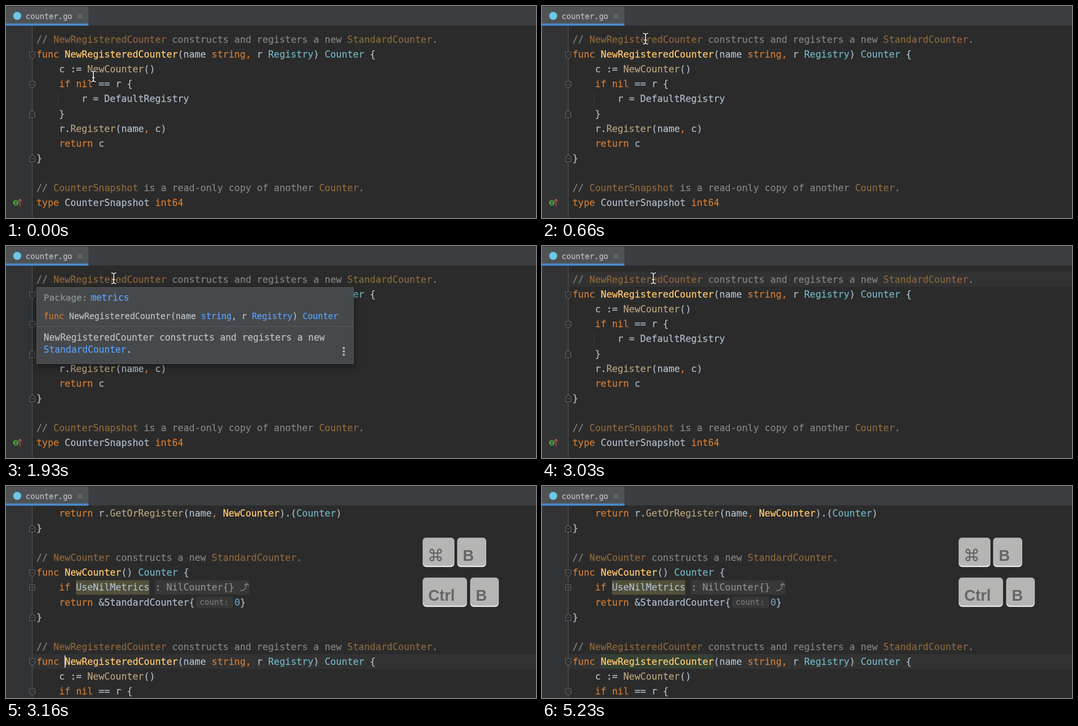
An HTML page with a canvas for the animation above (5.26 s loop, 1183 by 473 pixels).

```html
<!DOCTYPE html>
<html lang="en">
<head>
<meta charset="utf-8">
<title>Jump to declaration</title>
<style>
html, body { margin: 0; width: 100%; height: 100%; overflow: hidden; background: #2b2b2b; }
canvas { display: block; }
</style>
</head>
<body>
<canvas id="stage" width="1183" height="473"></canvas>
<script>
const ctx = document.getElementById('stage').getContext('2d');
const LOOP = 5260, ROW = 33.1, LEFT = 68, SIZE = 20.96;
const MONO = '"DejaVu Sans Mono", monospace';

const INK = {
  d: '#a9b7c6', k: '#cc7832', f: '#ffc66d', t: '#6fafbd', c: '#808080',
  r: '#8a653b', m: '#b09d79', n: '#6897bb', g: '#8c8c8c', h: '#787878',
  b: '#589df6', w: '#bbbbbb', p: '#8f9294'
};

// Each line: indent, then pairs of ink and text.
const CODE = [
  [4, 'k', 'return ', 'd', 'r.', 'm', 'GetOrRegister', 'd', '(name', 'k', ', ', 'f', 'NewCounter', 'd', ').(', 't', 'Counter', 'd', ')'],
  [0, 'd', '}'],
  [0],
  [0, 'c', '// ', 'r', 'NewCounter', 'c', ' constructs a new ', 'r', 'StandardCounter', 'c', '.'],
  [0, 'k', 'func ', 'f', 'NewCounter', 'd', '() ', 't', 'Counter', 'd', ' {'],
  [4, 'k', 'if ', 'd', 'UseNilMetrics ', 'g', ': NilCounter{}'],
  [4, 'k', 'return ', 'd', '&StandardCounter{'],
  [0, 'd', '}'],
  [0],
  [0, 'c', '// ', 'r', 'NewRegisteredCounter', 'c', ' constructs and registers a new ', 'r', 'StandardCounter', 'c', '.'],
  [0, 'k', 'func ', 'f', 'NewRegisteredCounter', 'd', '(name ', 'k', 'string, ', 'd', 'r ', 't', 'Registry', 'd', ') ', 't', 'Counter', 'd', ' {'],
  [4, 'd', 'c := ', 'm', 'NewCounter', 'd', '()'],
  [4, 'k', 'if nil ', 'd', '== r {'],
  [8, 'd', 'r = DefaultRegistry'],
  [4, 'd', '}'],
  [4, 'd', 'r.', 'm', 'Register', 'd', '(name', 'k', ', ', 'd', 'c)'],
  [4, 'k', 'return ', 'd', 'c'],
  [0, 'd', '}'],
  [0],
  [0, 'c', '// ', 'r', 'CounterSnapshot', 'c', ' is a read-only copy of another ', 'r', 'Counter', 'c', '.'],
  [0, 'k', 'type ', 'd', 'CounterSnapshot ', 'k', 'int64']
];
const FOLDS = { 1: 'end', 4: 'start', 5: 'plus', 7: 'end', 10: 'start', 12: 'start', 14: 'end', 17: 'end' };

function rect(x, y, w, h, fill) {
  ctx.fillStyle = fill;
  ctx.fillRect(x, y, w, h);
}

function disc(x, y, r, fill) {
  ctx.fillStyle = fill;
  ctx.beginPath();
  ctx.arc(x, y, r, 0, Math.PI * 2);
  ctx.fill();
}

function box(x, y, w, h, r, fill) {
  ctx.fillStyle = fill;
  ctx.beginPath();
  ctx.roundRect(x, y, w, h, r);
  ctx.fill();
}

function stroke(path, color, width) {
  ctx.strokeStyle = color;
  ctx.lineWidth = width;
  ctx.stroke(new Path2D(path));
}

// A hairline outline gives the glyphs a medium weight.
function text(x, y, size, ...runs) {
  ctx.font = `${size}px ${MONO}`;
  ctx.lineWidth = 0.35;
  ctx.lineJoin = 'round';
  for (let i = 0; i < runs.length; i += 2) {
    ctx.fillStyle = ctx.strokeStyle = INK[runs[i]];
    ctx.fillText(runs[i + 1], x, y);
    ctx.strokeText(runs[i + 1], x, y);
    x += ctx.measureText(runs[i + 1]).width;
  }
  ctx.lineJoin = 'miter';
}

function fold(kind, y) {
  const shape = {
    start: 'M-6-7H6V2L0 8L-6 2Z M-3-1H3',
    end: 'M-6 8H6V-2L0-8L-6-2Z M-3 1H3',
    plus: 'M-6-6H6V6H-6Z M-3 0H3M0-3V3'
  }[kind];
  ctx.save();
  ctx.translate(58.5, Math.floor(y) + (kind === 'start' ? 1.5 : 0.5));
  ctx.fillStyle = '#2b2b2b';
  ctx.fill(new Path2D(shape));
  stroke(shape, '#6b6d6f', 1.2);
  ctx.restore();
}

function implementsIcon(y) {
  disc(22, y, 6.5, '#4d9040');
  stroke(`M20 ${y - 3}h4m-2 0v6m-2 0h4`, '#20351c', 1.2);
  stroke(`M31.5 ${y + 8}V${y - 8}M28 ${y - 4}l3.5-4l3.5 4`, '#cf5b56', 1.6);
}

function inlays(y) {
  const a = y(5), b = y(6);
  rect(156, a - 16, 164, 32, '#52503a');
  rect(333, a - 16, 210, 32, '#383838');
  stroke(`M523 ${a + 7}C531 ${a + 8} 537 ${a + 2} 537 ${a - 8}M532 ${a - 4}l5-5l5 5`, INK.g, 1.5);
  box(424, b - 13, 83, 26, 6, '#373737');
  text(432, b + 5.5, 18, 'h', 'count:');
  text(510, b + 7, SIZE, 'n', '0', 'd', '}');
}

function editor(t) {
  const jumped = t >= 3130;
  const top = jumped ? 60.9 : -222.9;
  const y = n => top + ROW * n;

  rect(0, 0, 1183, 473, '#2b2b2b');
  rect(0, 0, 58, 473, '#313335');
  if (t >= 3030) rect(59, Math.round(y(jumped ? 10 : 9)) - 17, 1124, 33, '#323232');
  if (t >= 3500) rect(131, 375, 252, 33, '#344134');
  rect(58, 44, 1, 429, '#606264');
  rect(116, y(13) - 16, 1, 33, '#3d3d3d');
  inlays(y);
  CODE.forEach(([indent, ...runs], n) => {
    text(LEFT + indent * 12.6, y(n) + 7, SIZE, ...runs);
    if (FOLDS[n]) fold(FOLDS[n], y(n));
  });
  implementsIcon(y(20));
  if (jumped && (t < 4230 || (t >= 4730 && t < 5230))) rect(130.5, 378, 2.5, 27, '#c8c8c8');
}

function tabBar() {
  rect(0, 0, 1183, 44, '#3d3e42');
  rect(0, 0, 1183, 1.5, '#313235');
  rect(0, 42.5, 1183, 1.5, '#313235');
  rect(0, 1.5, 184, 38, '#4e5254');
  rect(0, 39, 184, 5, '#4a88c7');
  disc(25, 22, 9, '#6cc8e6');
  text(44, 28.5, 17.28, 'w', 'counter.go');
  stroke('M160.5 17.5l10 10m0-10l-10 10', '#7c8082', 1.4);
}

function popup() {
  ctx.save();
  ctx.shadowColor = 'rgba(0,0,0,.45)';
  ctx.shadowBlur = 18;
  ctx.shadowOffsetY = 5;
  rect(68, 92, 708, 171, '#5b5e60');
  ctx.restore();
  rect(69, 93, 706, 169, '#46494b');
  rect(69, 179, 706, 1, '#5f6264');
  text(84, 121.5, 20.3, 'p', 'Package:');
  text(189, 121.5, 20.4, 'b', 'metrics');
  text(84, 162.5, 18.83, 'k', 'func ', 'w', 'NewRegisteredCounter(name ', 'b', 'string', 'w', ', r ',
    'b', 'Registry', 'w', ') ', 'b', 'Counter');
  text(84, 211, 20.45, 'w', 'NewRegisteredCounter constructs and registers a new');
  text(84, 238, 20.45, 'b', 'StandardCounter', 'w', '.');
  for (const y of [227.5, 235, 242.5]) disc(754, y, 2.5, '#b4b6b8');
}

function key(x, y, w, label) {
  box(x, y, w, 66, 8, '#8b8b8a');
  box(x + 0.5, y + 1, w - 1, 64.5, 8, '#eeeeee');
  box(x + 1, y + 1, w - 2, 62, 7, '#b5b5b3');
  if (label) {
    ctx.font = 'bold 34.5px "Liberation Sans", Arial, sans-serif';
    ctx.fillStyle = '#666666';
    ctx.fillText(label, x + 12.5, y + 51.5);
  }
}

function commandSign(x, y) {
  ctx.save();
  ctx.translate(x, y);
  for (let i = 0; i < 4; i++) {
    stroke('M-4.5-4.5H4.5V-8A4 4 0 1 1 8.5-4.5H4.5', '#666666', 3);
    ctx.rotate(Math.PI / 2);
  }
  ctx.restore();
}

function keys() {
  key(930, 115, 71);
  commandSign(959, 154);
  key(1007, 115, 65, 'B');
  key(930, 204, 99, 'Ctrl');
  key(1036, 204, 64, 'B');
}

function pointerAt(t) {
  if (t < 530) {
    const u = Math.max(0, (t - 30) / 500), e = u * u * (3 - 2 * u);
    return [195 + 38.5 * e, 157 - 82 * e];
  }
  if (t < 560) return [233.5, 75];
  if (t < 660) return [232, 74];
  if (t < 1530) return [231, 73];
  if (t < 1560) return [233, 73];
  if (t < 1700) return [235.5, 73];
  if (t < 3030) {
    const u = Math.min(1, (t - 1700) / 230);
    return [235.5 + 5 * u, 73 - u];
  }
  return [248.5, 72];
}

function pointer(t) {
  const beam = 'M-5.5-12Q-1-12 0-9Q1-12 5.5-12M0-9V9M-5.5 12Q-1 12 0 9Q1 12 5.5 12M-3 3H3';
  ctx.save();
  ctx.translate(...pointerAt(t));
  stroke(beam, '#1b1b1b', 5);
  stroke(beam, '#e4e4e4', 2.2);
  ctx.restore();
}

function draw(now) {
  const t = now % LOOP;
  editor(t);
  tabBar();
  if (t >= 1260 && t < 3030) popup();
  if (t >= 3160) keys();
  if (t < 3130) pointer(t);
}

const start = performance.now();
function tick() {
  draw(performance.now() - start);
  requestAnimationFrame(tick);
}
tick();
</script>
</body>
</html>
```
